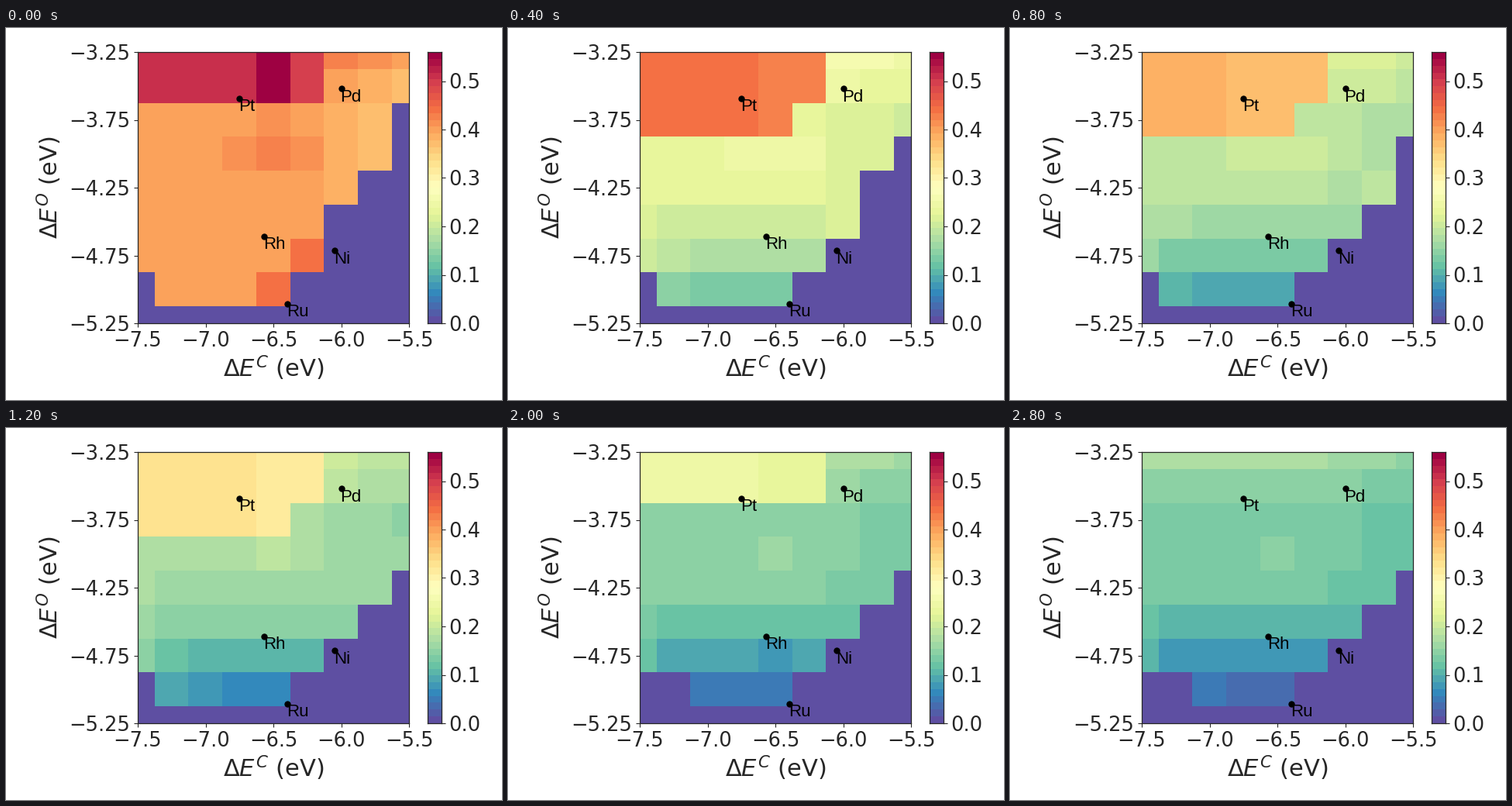
Write a matplotlib script that moves like this. It is 640 px wide and 480 px high and loops after 3000 ms.

```python
import numpy as np
import matplotlib.pyplot as plt
from matplotlib.animation import FuncAnimation

DPI = 100
W, H = 640, 480
FRAMES, STEP_MS = 15, 200
VMAX = 0.56
BANDS = 40
INK = "#262626"

plt.rcParams.update({
    "font.family": "DejaVu Sans",
    "axes.edgecolor": INK,
    "axes.linewidth": 0.9,
    "xtick.color": INK,
    "ytick.color": INK,
    "xtick.labelsize": 18.5,
    "ytick.labelsize": 18.5,
})

row, col = np.mgrid[0:9, 0:9]


def base_level(k):
    """Power-law decay, faster towards the bottom and away from the left."""
    upper = np.maximum(2 - row, 0)
    lower = np.maximum(row - 3, 0)
    power = 0.31 - 0.02 * upper + 0.0125 * lower ** 2.4
    power = power - 0.12 * np.exp(row - 6.0 - col)
    level = 0.395 * (1 + 0.05 * upper) * (1 + 4.8 * k) ** -power

    right_drop = 1 - 0.03 * np.maximum(col - 5, 0)
    hump = 1 + 0.09 * np.exp(-(col - 4) ** 2 / 1.5 - (row - 2.8) ** 2)
    rim = 1 + 0.1 * (row + col == 11) * np.exp(-k / 4)
    return level * right_drop * hump * rim


def plateau(k):
    """High coverage in the upper left, with a short-lived ridge."""
    level = 0.515 * np.exp(-0.15 * k) * (1 - 0.012 * np.maximum(col - 2, 0))
    return level + 0.06 * np.exp(-3 * (col - 4) ** 2 - 4 * k)


def surface(frame):
    k = frame / 2
    depth = 2 + (0 < k < 5) - (k > 6)
    high = (row < depth) & (col + row // 2 < 6)

    # The covered region ends at a staircase that moves outwards.
    front = np.minimum(9.27 + 0.34 * (row + k), 12)
    left_end = (row - 6) * (1 + k // 5)
    covered = (row + col < front) & (col >= left_end) & (row < 8)
    return np.where(covered, np.where(high, plateau(k), base_level(k)), 0)


def box(left, top, width, height):
    return fig.add_axes([left / W, 1 - (top + height) / H,
                         width / W, height / H])


def heatmap(axes, data, extent, origin):
    return axes.imshow(data, cmap=cmap, vmin=0, vmax=VMAX, aspect="auto",
                       interpolation="nearest", extent=extent, origin=origin)


def axis_label(x, y, symbol, angle):
    fig.text(x / W, 1 - y / H, rf"$\Delta E^{symbol}$ (eV)", fontsize=22,
             color=INK, ha="center", va="baseline", rotation=angle,
             rotation_mode="anchor")


fig = plt.figure(figsize=(W / DPI, H / DPI), dpi=DPI, facecolor="white")
cmap = plt.get_cmap("Spectral_r", BANDS)

ax = box(170, 31, 350, 350)
mesh = heatmap(ax, surface(0), (-7.625, -5.375, -5.375, -3.125), "upper")
ax.set_xlim(-7.5, -5.5)
ax.set_ylim(-5.25, -3.25)
ax.set_xticks(np.arange(-7.5, -5.4, 0.5))
ax.set_yticks(np.arange(-5.25, -3.2, 0.5))
axis_label(345, 450, "C", 0)
axis_label(67, 205.5, "O", 90)

metals = {
    "Pt": (-6.75, -3.59),
    "Pd": (-6.00, -3.52),
    "Rh": (-6.57, -4.61),
    "Ni": (-6.05, -4.715),
    "Ru": (-6.395, -5.105),
}
for name, spot in metals.items():
    ax.plot(*spot, "o", color="black", markersize=6, markeredgewidth=0)
    ax.annotate(name, spot, xytext=(-0.7, -0.3), textcoords="offset points",
                color="black", fontsize=16, va="top",
                family="Liberation Sans")

bar = box(544, 31, 18, 350)
heatmap(bar, np.linspace(0, VMAX, 350)[:, None], (0, 1, 0, VMAX), "lower")
bar.set_xticks([])
bar.set_yticks(np.arange(0, 0.55, 0.1))
bar.yaxis.tick_right()


def draw(frame):
    mesh.set_data(surface(frame))
    return (mesh,)


anim = FuncAnimation(fig, draw, frames=FRAMES, interval=STEP_MS,
                     repeat=True, repeat_delay=0, blit=False)
plt.show()
```
